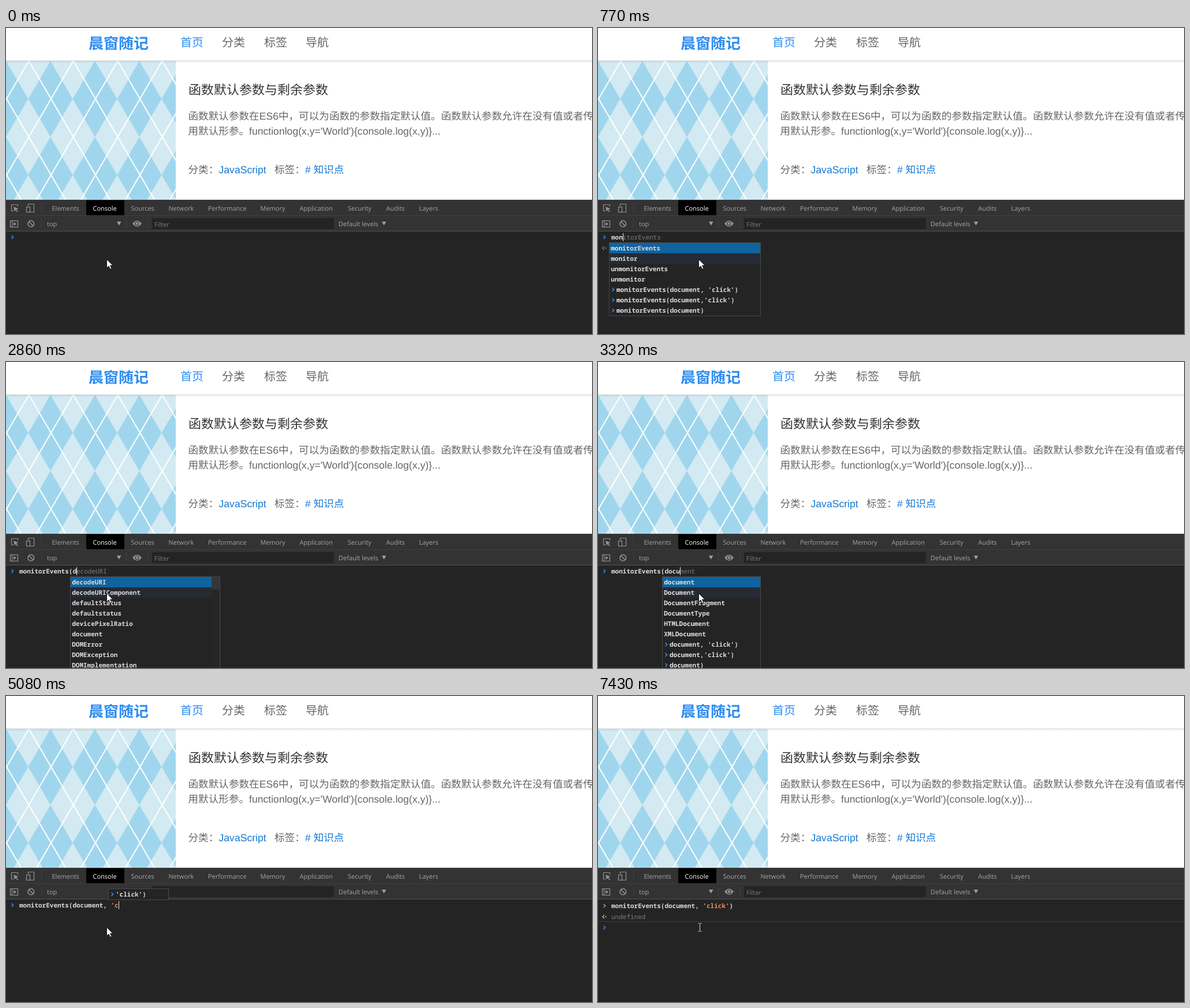
These frames come from a looping animation (1015 px wide and 531 px high, 7.99 s). An HTML page:

```html
<!DOCTYPE html>
<html lang="zh-CN">
<head>
<meta charset="utf-8">
<title>Console typing</title>
<style>
  html, body { margin: 0; width: 100%; height: 100%; overflow: hidden; background: #242424; }
  svg { display: block; width: 1015px; height: 531px; }
  text { white-space: pre; text-rendering: geometricPrecision; }
  .page { font-family: "Liberation Sans", "Noto Sans CJK SC", "Noto Sans CJK", sans-serif; font-size: 17.6px; fill: #666; }
  .page .nav { font-size: 20px; }
  .page .brand { font-size: 26px; font-weight: 700; }
  .page .head { font-size: 22px; fill: #333; }
  .page .blue { fill: #2d8cf0; }
  .page .link { fill: #1576d2; }
  .ui { font-family: "Open Sans", "Noto Sans", sans-serif; font-size: 11px; fill: #a5a5a5; }
  .icon { fill: none; stroke: #919191; stroke-width: 1.2; }
  .mono { font-family: "Noto Sans Mono", "Liberation Mono", monospace; font-size: 11px; font-weight: 600; fill: #dadada; }
  .mono .dim { fill: #7c7c7c; font-weight: 400; }
  .mono .str { fill: #ee8d57; }
  .mono .hit { font-weight: 700; fill: #e8e8e8; }
</style>
</head>
<body>
<svg viewBox="0 0 1015 531" xmlns="http://www.w3.org/2000/svg">
  <defs>
    <pattern id="argyle" width="77" height="132" patternUnits="userSpaceOnUse" patternTransform="translate(0 123)">
      <rect width="77" height="132" fill="#a0d6ed"/>
      <path d="M38.5 0L77 66L38.5 132L0 66Z" fill="#d3eaf2"/>
      <path d="M-76 -132L78 132M1 -132L155 132M-76 264L78 0M1 264L155 0M1 0L78 132M78 0L1 132M-76 0L1 132M1 0L-76 132" stroke="#fff" stroke-width="2"/>
    </pattern>
    <linearGradient id="shade" x2="0" y2="1">
      <stop stop-color="#000" stop-opacity=".11"/>
      <stop offset="1" stop-color="#000" stop-opacity="0"/>
    </linearGradient>
  </defs>

  <rect width="1015" height="298" fill="#fff"/>
  <rect y="57" width="294" height="241" fill="url(#argyle)"/>
  <rect y="56" width="1015" height="5" fill="url(#shade)"/>
  <g class="page">
    <text class="brand blue" x="143" y="35.5">晨窗随记</text>
    <text class="nav blue" x="302" y="31.5">首页</text>
    <text class="nav" x="374" y="31.5">分类</text>
    <text class="nav" x="447" y="31.5">标签</text>
    <text class="nav" x="519" y="31.5">导航</text>
    <text class="head" x="316" y="115">函数默认参数与剩余参数</text>
    <text x="315.5" y="159">函数默认参数在ES6中，可以为函数的参数指定默认值。函数默认参数允许在没有值或者传</text>
    <text x="315.5" y="185">用默认形参。functionlog(x,y='World'){console.log(x,y)}...</text>
    <text x="315.5" y="252">分类：</text>
    <text class="link" x="368.5" y="252">JavaScript</text>
    <text x="465" y="252">标签：</text>
    <text class="link" x="518" y="252"># 知识点</text>
  </g>

  <rect y="298" width="1015" height="233" fill="#242424"/>
  <rect y="298" width="1015" height="54" fill="#333"/>
  <path d="M0 298.5H1015M0 325.5H1015" stroke="#3f3f3f"/>
  <path d="M0 352.5H1015" stroke="#515151"/>
  <rect x="139" y="299" width="66" height="26" fill="#000"/>
  <rect x="253" y="330" width="315" height="19" fill="#242424"/>
  <path d="M61.5 304V320M61.5 332V347M208.5 332V347M245.5 332V347" stroke="#434343"/>
  <g class="icon">
    <path d="M13 317.5H9.5V306.5H20.5V310"/>
    <path d="M13 310L21.5 313.5L18 315L21 318.5L19.5 319.5L16.8 316L14.8 318.5Z" fill="#919191" stroke="none"/>
    <path d="M38.5 309V305.5H48.5V319.5H42"/><rect x="35.5" y="310.5" width="6" height="9"/>
    <rect x="7.5" y="334.5" width="13" height="11"/><path d="M10.5 334V346"/>
    <path d="M13 337L18.5 340L13 343Z" fill="#919191" stroke="none"/>
    <circle cx="43.3" cy="339.7" r="5.3" stroke-width="1.6"/><path d="M39.6 336L47 343.4" stroke-width="1.6"/>
    <path d="M219 339.5Q227 329.5 235 339.5Q227 349.5 219 339.5Z" fill="#919191" stroke="none"/>
    <circle cx="227" cy="339.5" r="3" stroke="#333"/>
    <path d="M192 336H199.5L195.7 342.5ZM651 336H658.5L654.7 342.5Z" fill="#a0a0a0" stroke="none"/>
  </g>
  <g class="ui" id="tabs">
    <text x="71" y="344">top</text>
    <text x="257" y="344.5" fill="#7d7d7d">Filter</text>
    <text x="576" y="344">Default levels</text>
  </g>
  <g class="mono" id="live"></g>
  <path id="arrow" d="M174.5 401.5V416.2L178 413L180.4 418.3L182.9 417.2L180.5 412H185.2Z" fill="#fff" stroke="#111" stroke-width=".9"/>
  <path id="beam" d="M173.5 394.5H175.5L176.5 395.5L177.5 394.5H179.5M176.5 395V408M173.5 408.5H175.5L176.5 407.5L177.5 408.5H179.5" fill="none" stroke="#d8d8d8"/>
</svg>
<script>
const $ = id => document.getElementById(id);
const LOOP = 7990, CH = 6.6, LEFT = 23, ROW = 18, BLUE = '#3b8bf0';
const rect = (x, y, w, h, fill) => `<rect x="${x}" y="${y}" width="${w}" height="${h}" fill="${fill}"/>`;
const text = (x, y, s, cls = '') => `<text x="${x}" y="${y}" class="${cls}">${s}</text>`;
const span = (s, cls) => s && `<tspan class="${cls}">${s}</tspan>`;
const chevron = (x, y, color) =>
  `<path d="M${x} ${y - 3}l3.2 3l-3.2 3" fill="none" stroke="${color}" stroke-width="1.5"/>`;
const reply = (y, color) =>
  `<path d="M11 ${y - 3}l-3.2 3l3.2 3" fill="none" stroke="${color}" stroke-width="1.3"/>` + rect(12.5, y - 1, 2, 2, color);

const tabs = { Elements: 79.5, Console: 150.5, Sources: 216.5, Network: 281.5, Performance: 350,
  Memory: 440.5, Application: 508.5, Security: 592, Audits: 658.5, Layers: 715.5 };
for (const [name, x] of Object.entries(tabs))
  $('tabs').innerHTML += `<text x="${x}" y="317" ${name === 'Console' ? 'fill="#fff"' : ''}>${name}</text>`;

// Suggestions: a leading ">" marks an entry from the history.
const list = s => s.split('|');
const calls = list(">monitorEvents(document, 'click')|>monitorEvents(document,'click')|>monitorEvents(document)");
const args = calls.map(s => s.replace('monitorEvents(', ''));
const menus = {
  m: { x: 19, w: 273, bar: 1, items: list('matchMedia|moveBy|moveTo|monitorEvents|monitor|Map|Math|MediaDevices|MediaError') },
  mo: { x: 19, w: 263, items: [...list('moveBy|moveTo|monitorEvents|monitor|unmonitorEvents|unmonitor'), ...calls] },
  mon: { x: 19, w: 263, items: [...list('monitorEvents|monitor|unmonitorEvents|unmonitor'), ...calls] },
  args: { x: 111, w: 171, plain: 1, items: args },
  d: { x: 111, w: 260, bar: 1, items: list('decodeURI|decodeURIComponent|defaultStatus|defaultstatus|devicePixelRatio|document|DOMError|DOMException|DOMImplementation') },
  do: { x: 111, w: 260, bar: 1, items: list('document|DOMError|DOMException|DOMImplementation|DOMMatrix|DOMMatrixReadOnly|DOMParser|DOMPoint|DOMPointReadOnly') },
  doc: { x: 111, w: 171, items: [...list('document|Document|DocumentFragment|DocumentType|HTMLDocument|XMLDocument'), ...args] },
  two: { x: 171, y: 316, w: 105, plain: 1, items: list(">'click')|>'click')") },
  one: { x: 177, y: 334, w: 105, plain: 1, items: list(">'click')") },
};

function drawMenu({ x, y = 372, w, bar, plain, items }, typed) {
  const inner = w - 2 - (bar ? 14 : 0);
  let out = `<rect x="${x + .5}" y="${y + .5}" width="${w - 1}" height="${items.length * ROW + 1}" fill="#242424" stroke="#484848"/>`;
  items.forEach((item, i) => {
    const top = y + 1 + i * ROW, past = item[0] === '>', s = past ? item.slice(1) : item;
    if (!i && !plain) out += rect(x + 1, top, inner, ROW, '#10639f');
    if (i === 1 && y > 353) out += rect(x + 1, top, inner, ROW, '#252a35');
    if (past) out += chevron(x + 5.5, top + 9, BLUE);
    const at = typed ? s.toLowerCase().indexOf(typed) : -1, end = at + typed.length;
    out += text(x + (past ? 13 : 3.2), top + 13, at < 0 ? s : s.slice(0, at) + span(s.slice(at, end), 'hit') + s.slice(end));
  });
  if (bar) out += rect(x + w - 15, y + 1, 14, 170, '#262626') + rect(x + w - 15, y + 1, 14, 22, '#363636');
  return out;
}

const code = s => {
  const q = s.indexOf("'");
  if (q < 0) return s;
  const close = s.indexOf("'", q + 1) + 1 || s.length;
  return s.slice(0, q) + span(s.slice(q, close), 'str') + s.slice(close);
};

function drawPrompt({ s = '', caret = 1, menu, typed = '', ghost = '', result, faint, y = 363, pair }) {
  let out = chevron(9.5, y, faint ? '#2c5c96' : BLUE);
  out += text(LEFT, y + 4, code(s) + span(ghost, 'dim'));
  if (result !== undefined)
    out += reply(382, '#7d7d7d') + `<text x="23" y="387" class="dim" font-style="italic">${result}</text>`;
  if (pair) for (const c of '()') out += rect(LEFT + s.indexOf(c) * CH, 370, CH, 1, '#777');
  if (menu) out += drawMenu(menus[menu], typed);
  if (caret) out += rect(Math.round(LEFT + s.length * CH), y - 7, 1, 14, '#e8e8e8');
  return out;
}

const fn = 'monitorEvents', open = fn + '(', doc = open + 'document', full = doc + ", 'click')";
const type = (base, typed, menu, word = '', more = {}) =>
  ({ s: base + typed, typed, menu, ghost: word.slice(typed.length), ...more });
const quote = typed => type(doc + ', ', typed, 'one');
const steps = [
  [0, { caret: 0 }], [80, {}],
  [410, type('', 'm', '', 'matchMedia')],
  [540, type('', 'm', 'm', 'matchMedia', { result: '' })],
  [650, type('', 'mo', 'mo', 'moveBy', { result: '' })],
  [770, type('', 'mon', 'mon', fn, { result: '' })],
  [820, type('', 'moni', 'mon', fn, { result: '' })],
  [1380, type('', 'moni', 'mon', fn, { result: '', caret: 0 })],
  [1610, { s: fn, result: 'ƒ' }],
  [2070, { s: fn, result: 'ƒ', caret: 0 }],
  [2220, { s: open, menu: 'args', faint: 1 }],
  [2730, type(open, 'd', 'args', 'document')],
  [2860, type(open, 'd', 'd', 'decodeURI')],
  [3010, type(open, 'do', 'do', 'document')],
  [3140, type(open, 'doc', 'doc', 'document')],
  [3320, type(open, 'docu', 'doc', 'document')],
  [3830, { s: doc }],
  [4240, { s: doc + ',', menu: 'two', faint: 1 }],
  [4570, { s: doc + ', ', menu: 'one', faint: 1 }],
  [4850, quote("'")], [5080, quote("'c")], [5210, quote("'cl")],
  [5370, quote("'cli")], [5450, quote("'clic")], [5540, quote("'click")],
  [6100, { ...quote("'click"), caret: 0 }],
  [6330, quote("'click'")],
  [6610, { s: full, pair: 1 }],
  [6890, { done: 1, y: 383 }],
  [6940, { done: 2, y: 402 }],
  [7430, { done: 2, y: 402, caret: 0 }],
];

function drawDone(stage) {
  let out = chevron(9.5, 364, '#a0a0a0') + text(LEFT, 368, code(full));
  if (stage > 1)
    out += reply(383, '#c0c0c0') + text(LEFT, 387, 'undefined', 'dim') + rect(0, 391, 1015, 1, '#3c3c3c');
  return out;
}

const start = performance.now();
let shown;
function frame() {
  const t = (performance.now() - start) % LOOP;
  const state = steps.findLast(([at]) => at <= t)[1];
  if (state !== shown) {
    shown = state;
    $('live').innerHTML = (state.done ? drawDone(state.done) : '') + drawPrompt(state);
    const beam = state.done === 2;
    $('beam').style.display = beam ? '' : 'none';
    $('arrow').style.display = beam ? 'none' : '';
  }
  requestAnimationFrame(frame);
}
frame();
</script>
</body>
</html>
```
